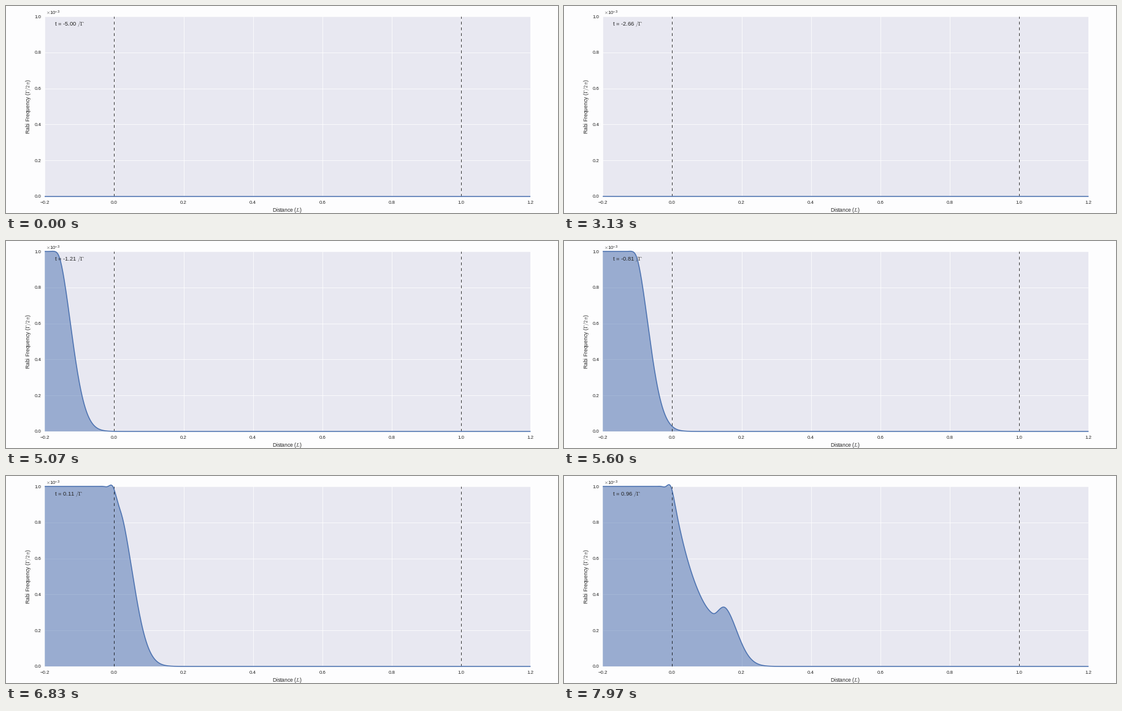
Write a matplotlib script that moves like this. It is 900 px wide and 338 px high and loops after 8000 ms.

```python
import numpy as np
import matplotlib.pyplot as plt
from matplotlib.animation import FuncAnimation

W, H, DPI = 900, 338, 56.25
STEPS, LOOP_MS = 240, 8000
FRAMES = 2 * STEPS    # two ticks per step
T_START, T_STEP = -5, 10 / 401

SPEED = 0.1396        # vacuum speed, L per 1/Gamma
FWHM = 0.715          # of the Gaussian ramp, which ends at t = 0
GAMMA = np.pi         # coherence decay rate
DEPTH = 11.8          # amplitude absorption over the whole medium
ENTRY = -0.001

INK, BLUE = "#262626", "#4C72B0"

plt.rcParams.update({
    "font.family": "Liberation Sans",
    "mathtext.fontset": "cm",
    "text.color": INK,
    "xtick.color": INK,
    "ytick.color": INK,
})


def spline_basis(nodes, xs):
    """Matrix taking values at evenly spaced nodes to a cubic spline at xs."""
    n, h = len(nodes), nodes[1] - nodes[0]
    eye = np.eye(n)
    system = 4 * eye + np.eye(n, k=1) + np.eye(n, k=-1)
    curve = 6 / h**2 * (np.eye(n, k=1) + np.eye(n, k=-1) - 2 * eye)
    for end in (0, -1):
        system[end], curve[end] = eye[end], 0
    m = np.linalg.solve(system, curve)
    i = np.clip(((xs - nodes[0]) / h).astype(int), 0, n - 2)
    b = ((xs - nodes[i]) / h)[:, None]
    a = 1 - b
    bend = (a**3 - a) * m[i] + (b**3 - b) * m[i + 1]
    return a * eye[i] + b * eye[i + 1] + bend * h**2 / 6


def absorbed_pulses(nodes, tau):
    """Ramped-on field at every node, in retarded time."""
    ramp = np.exp(-4 * np.log(2) * (tau / FWHM) ** 2)
    pulse = np.where(tau < 0, ramp, 1)
    omega = 2 * np.pi * np.fft.fftfreq(len(tau), tau[1] - tau[0])
    depth = DEPTH * np.clip(nodes - ENTRY, 0, 1)
    transfer = np.exp(-depth[:, None] * GAMMA / (GAMMA + 1j * omega))
    field = np.fft.ifft(np.fft.fft(pulse) * transfer, axis=1).real
    field[:, tau < -2.5] = 0
    return field


nodes = np.linspace(-0.2, 1.2, 101)
xs = np.linspace(-0.2, 1.2, 801)
tau = np.linspace(-6, 6, 4096, endpoint=False)
basis = spline_basis(nodes, xs)
pulses = absorbed_pulses(nodes, tau)


def field_at(t):
    local = t - nodes / SPEED
    return basis @ [np.interp(s, tau, p) for s, p in zip(local, pulses)]


fig = plt.figure(figsize=(W / DPI, (H + 0.01) / DPI), dpi=DPI,
                 facecolor="#fdfdfe")
left, right, top, bottom = 63.2, 855.3, 17, 310.9
ax = fig.add_axes([left / W, 1 - bottom / H,
                   (right - left) / W, (bottom - top) / H],
                  facecolor="#e8e8f1")
ax.set(xlim=(-0.2, 1.2), ylim=(0, 1))
ticks = np.arange(-1, 7) * 0.2
ax.set_xticks(ticks, [f"{v:.1f}".replace("-", "\u2212") for v in ticks])
ax.set_yticks(ticks[1:7], [f"{v:.1f}" for v in ticks[1:7]])
ax.tick_params(axis="x", length=0, pad=8.5, labelsize=10)
ax.tick_params(axis="y", length=0, pad=7, labelsize=10)
ax.set_axisbelow(True)
ax.grid(color="white", linewidth=1)
for spine in ax.spines.values():
    spine.set_visible(False)


def label(x, y, text, size, **kw):
    return fig.text(x / W, 1 - y / H, text, fontsize=size, **kw)


label(459, 333.5, "Distance ($L$)", 11, ha="center", va="center")
label(36.5, 164, r"Rabi Frequency ($\Gamma/2\pi$)", 11,
      ha="center", va="center", rotation=90)
label(65, 14.7, r"${\times}\mathregular{10^{-3}}$", 10, va="baseline")

for edge in (0, 1):
    ax.axvline(edge, color="black", linewidth=1, linestyle=(0, (6, 6)))

area, = ax.fill([0, 0, 0], [0, 0, 0], color=BLUE, alpha=0.5, linewidth=0,
                clip_on=False)
line, = ax.plot(xs, 0 * xs, color=BLUE, linewidth=2, clip_on=False,
                solid_capstyle="butt")
clock = ax.text(0.02, 0.95, "", transform=ax.transAxes, fontsize=12)


def draw(tick):
    step = min((tick + 1) // 2, STEPS - 1)
    t = T_START + step * T_STEP
    ys = field_at(t)
    line.set_ydata(ys)
    area.set_xy(np.column_stack([np.r_[-0.2, xs, 1.2], np.r_[0, ys, 0]]))
    clock.set_text(rf"t = {t:.2f} $/\Gamma$")
    return area, line, clock


anim = FuncAnimation(fig, draw, frames=FRAMES, interval=LOOP_MS / FRAMES,
                     init_func=lambda: draw(0), repeat=True, repeat_delay=0)
plt.show()
```
